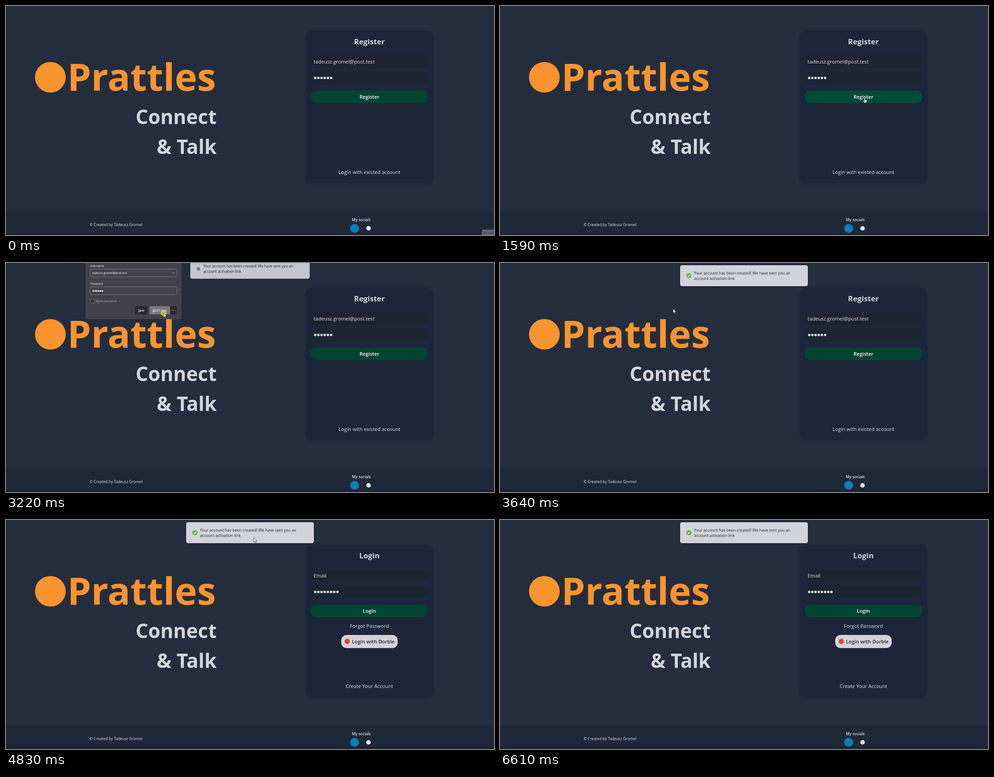
Write an HTML page that moves like this. It is 1089 by 514 pixels and loops after 6.93 s.

```html
<!DOCTYPE html>
<html lang="en">
<head>
<meta charset="utf-8">
<title>Register</title>
<style>
html, body { margin: 0; height: 100%; overflow: hidden; background: #242d3d; }
svg { display: block; width: 100vw; height: 100vh; font: 11.2px "Open Sans", "Noto Sans", sans-serif; fill: #dfe2e5; }
.mid { text-anchor: middle; }
.bold { font-weight: 700; }
.semi { font-weight: 600; }
.title { font-size: 16.8px; fill: #d3d6da; }
.slogan { font-size: 44px; text-anchor: end; fill: #d3d6da; }
.input { fill: #1c2430; }
.dots { fill: none; stroke: #dfe2e5; stroke-width: 5.4; stroke-linecap: round; stroke-dasharray: 0 7.1; }
.foot { font-size: 8.5px; }
#popup { font-size: 6.4px; fill: #fbfbfe; }
#popup .field { fill: none; stroke: #8f8d99; stroke-width: .8; }
#popup .dark { fill: #2b2a33; }
#popup .chevron { fill: none; stroke: #e4e3ea; stroke-width: .8; }
#popup .dots { stroke: #fbfbfe; stroke-width: 3.4; stroke-dasharray: 0 4.1; }
#popup tspan { text-decoration: underline; }
#toast text { font-size: 8.75px; fill: #20272f; }
</style>
</head>
<body>
<svg viewBox="0 0 1089 514">
  <defs>
    <filter id="shadow" x="-10%" y="-10%" width="120%" height="120%">
      <feDropShadow dx="0" dy="1" stdDeviation="2.5" flood-color="#1a2230" flood-opacity=".25"/>
    </filter>
  </defs>
  <rect width="1089" height="514" fill="#242d3d"/>

  <circle cx="99" cy="160" r="34.3" fill="#f9942f"/>
  <text class="bold" x="137" y="190" font-size="84.4" fill="#f9942f">Prattles</text>
  <text class="bold slogan" x="470" y="264.5">Connect</text>
  <text class="bold slogan" x="470" y="331.5">&amp; Talk</text>

  <rect x="669" y="56" width="284" height="342" rx="12" fill="#1f2838" filter="url(#shadow)"/>
  <rect class="input" x="680" y="110" width="262" height="29" rx="12"/>
  <rect class="input" x="680" y="147" width="262" height="29" rx="12"/>
  <rect id="button" x="680" y="190" width="262" height="28" rx="12"/>

  <g id="register">
    <text class="mid bold title" x="811" y="86">Register</text>
    <text x="686.5" y="129">tadeusz.gromel@post.test</text>
    <path class="dots" d="M690 161.5h36"/>
    <text class="mid semi" x="811" y="207.7" fill="#fff">Register</text>
    <text class="mid" x="811" y="377">Login with existed account</text>
  </g>
  <g id="login">
    <text class="mid bold title" x="811" y="86">Login</text>
    <text x="686.5" y="129">Email</text>
    <path class="dots" d="M690 161.5h50"/>
    <text class="mid semi" x="811" y="207.7" fill="#fff">Login</text>
    <text class="mid" x="811" y="242">Forgot Password</text>
    <rect x="748" y="258" width="126" height="29.5" rx="12" fill="#d2d4d9"/>
    <circle cx="761.5" cy="272.5" r="6" fill="#dc4a3a"/>
    <text class="semi" x="772" y="276.7" fill="#1f2737">Login with Dorble</text>
    <text class="mid" x="811" y="377">Create Your Account</text>
  </g>

  <rect y="462" width="1089" height="52" fill="#1f2838"/>
  <rect y="510" width="1089" height="4" fill="#1c2431"/>
  <text class="foot" x="186.5" y="494">© Created by Tadeusz Gromel</text>
  <text class="foot mid semi" x="793" y="482.5">My socials</text>
  <circle cx="778" cy="499" r="10" fill="#0a7db8"/>
  <circle cx="809" cy="499" r="5" fill="#eef0f2"/>

  <g id="tip">
    <rect x="1062" y="502" width="30" height="14" rx="1.5" fill="#60666f"/>
    <text x="1065" y="511.5" font-size="6.8" fill="#2b3038">Record</text>
  </g>

  <g id="popup">
    <rect x="178.5" y="-60" width="212.5" height="185" rx="4" fill="#42404b" stroke="#56545f" stroke-width=".8"/>
    <text x="188" y="9">Username</text>
    <rect class="field" x="188" y="13.5" width="193.5" height="17.5" rx="2"/>
    <text x="192.5" y="24.7">tadeusz.gromel@post.test</text>
    <path class="chevron" d="M371.5 21.3l2.3 2.3 2.3-2.3"/>
    <text x="188" y="49">Password</text>
    <rect class="field" x="188" y="53.5" width="193.5" height="17.5" rx="2"/>
    <path class="dots" d="M194.7 62.7h21"/>
    <rect class="field" x="188.4" y="81.2" width="8.6" height="8.6" rx="1" style="fill:#2b2a33"/>
    <text x="200" y="88.3" fill="#aeacb6">S<tspan>h</tspan>ow password</text>
    <rect class="dark" x="288" y="97" width="27.5" height="18.5" rx="2"/>
    <text class="mid semi" x="301.7" y="108.7"><tspan>S</tspan>ave</text>
    <rect class="dark" x="320" y="97" width="61.5" height="18.5" rx="2"/>
    <rect id="skip" x="320" y="97" width="46" height="18.5" rx="2" fill="#7b7984"/>
    <text class="mid semi" x="343" y="108.7"><tspan>D</tspan>on't save</text>
    <path class="chevron" d="M371.5 105.3l2.3 2.3 2.3-2.3"/>
  </g>

  <g id="toast">
    <rect x="402" y="5" width="285" height="47" rx="4.5" fill="#d2d4d9" filter="url(#shadow)"/>
    <circle id="loader" cx="421.5" cy="28.5" r="3.3" fill="#80838b" stroke="#6a6d75" stroke-width="1.2"/>
    <g id="check">
      <circle r="5.8" fill="#5cb84a"/>
      <path id="tick" d="M-2.6.2l1.9 1.9L2.7-1.8" fill="none" stroke="#fff" stroke-width="1.3"/>
    </g>
    <text x="433" y="25.5">Your account has been created! We have sent you an</text>
    <text x="433" y="37.5">account activation link</text>
  </g>

  <g id="cursor">
    <circle id="click" r="6.5" fill="#e6dc14" opacity=".7"/>
    <path id="arrow" d="M0 0V9.6L2.2 7.5 3.7 10.9 5.3 10.2 3.8 7H6.9Z" fill="#fff" stroke="#1b1e24" stroke-width=".7"/>
    <path id="hand" d="M-.9 1Q0-.6.9 1V4.6L4.6 5.4Q5.5 5.8 5.3 7.5L4.4 11.6H-.8L-3.6 7.6Q-3.9 6.2-2.4 6.4L-.9 7.8Z" fill="#fff" stroke="#1b1e24" stroke-width=".7"/>
    <g id="denied" fill="none" stroke="#d8232f" stroke-width="1.7">
      <circle r="4.6" fill="#fff" stroke="none"/>
      <circle r="3.4"/>
      <path d="M-2.4-2.4L2.4 2.4"/>
    </g>
  </g>
</svg>
<script>
const LOOP = 6930;
// Bursts of screen updates: first, last, count
const bursts = [[0, 70, 2], [400, 1090, 11], [1160, 1730, 9], [1860, 2140, 5], [2400, 3020, 10], [3150, 3780, 10],
  [3850, 4480, 10], [4550, 5180, 10], [5250, 5880, 10], [6010, 6610, 10]];
// Pointer stops: time, x, y
const stops = [[400, 1052, 495], [1090, 827, 277], [1590, 813.5, 205.5], [1860, 813.5, 205.5], [1861, 810.5, 204],
  [2330, 810.5, 204], [3020, 351.5, 112.5], [3500, 351.5, 112.5], [3780, 421, 93], [4060, 500, 52],
  [4270, 558, 19], [4480, 530, 26], [4620, 509, 16], [4830, 553, 40], [5180, 579, 95],
  [5880, 649, 211], [5940, 649, 211], [6610, 1050, 522]];

const $ = id => document.getElementById(id);
const clamp = v => Math.min(1, Math.max(0, v));
const ramp = (t, from, to) => clamp((t - from) / (to - from));
const mix = (a, b, p) => a + (b - a) * p;
const show = (id, on) => $(id).style.display = on ? "" : "none";
const within = (t, a, b) => t >= a && t < b;

function snap(t) {
  const [a, b, n] = bursts.findLast(s => t >= s[0]);
  const step = (b - a) / (n - 1);
  return Math.min(b, a + Math.floor((t - a) / step + 1e-6) * step);
}

function pointer(t) {
  const i = Math.max(1, stops.findIndex(s => s[0] >= t));
  const [a, b] = [stops[i - 1], stops[i]];
  const p = ramp(t, a[0], b[0]), e = p * p * (3 - 2 * p);
  return [mix(a[1], b[1], e), mix(a[2], b[2], e)];
}

function draw(t) {
  show("tip", t < 70);
  show("register", t < 3710);
  show("login", t >= 3710);

  const hover = ramp(t, 1450, 1750) * (1 - ramp(t, 2480, 2650));
  $("button").setAttribute("fill", `rgb(0,${mix(69, 82, hover)},${mix(50, 58, hover)})`);

  const open = ramp(t, 1860, 2100);
  show("popup", within(t, 1860, 3360));
  $("popup").setAttribute("opacity", open);
  $("popup").setAttribute("transform", `translate(0 ${-40 * (1 - open) ** 3})`);
  show("skip", t >= 2940);

  const drop = 1 - (1 - ramp(t, 3075, 3425)) ** 3.4;
  show("toast", t >= 3150);
  $("toast").setAttribute("opacity", mix(.5, 1, drop));
  $("toast").setAttribute("transform",
    `translate(544.5 ${28.5 - 94 * (1 - drop)}) scale(${mix(.6, 1, drop)}) translate(-544.5 -28.5)`);
  const grow = ramp(t, 3230, 3480);
  show("loader", grow < .5);
  show("tick", t >= 3350);
  $("check").setAttribute("transform", `translate(421.5 28.5) scale(${1 - (1 - grow) ** 3})`);

  const [x, y] = pointer(t);
  const denied = within(t, 1860, 2480), hand = !denied && t < 1860 && y < 218;
  show("cursor", within(t, 400, 6610));
  show("denied", denied);
  show("hand", hand);
  show("arrow", !denied && !hand);
  show("click", within(t, 1730, 1860) || within(t, 3150, 3360));
  $("cursor").setAttribute("transform", `translate(${x} ${y})`);
}

const start = performance.now();
function tick(now) {
  draw(snap(Math.max(0, now - start) % LOOP));
  requestAnimationFrame(tick);
}
tick(start);
</script>
</body>
</html>
```
